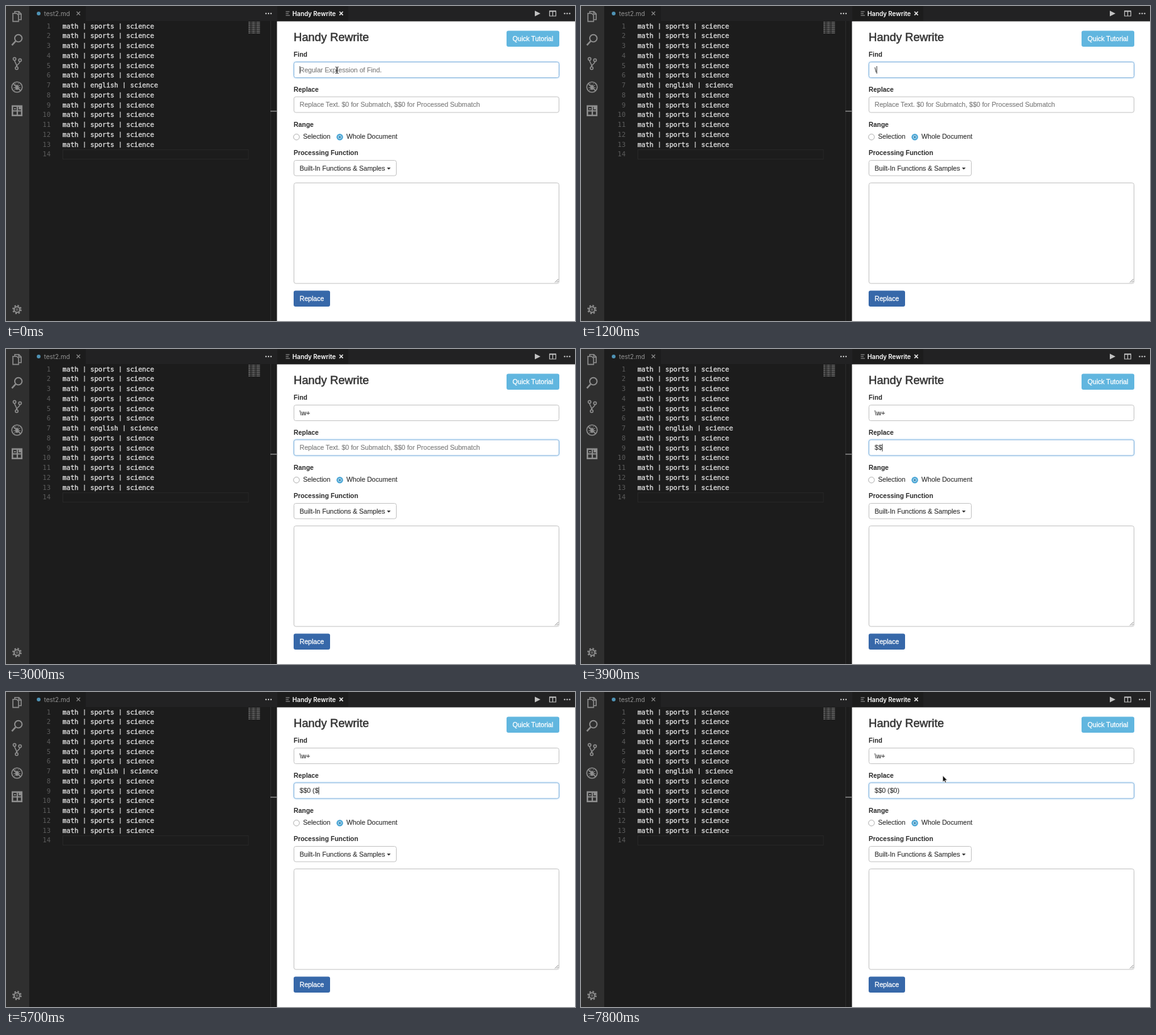
Write an HTML page that moves like this. It is 906 px wide and 503 px high and loops after 8000 ms.

```html
<!DOCTYPE html>
<html lang="en">
<head>
<meta charset="utf-8">
<title>Find and replace form</title>
<style>
  html, body { margin: 0; width: 100%; height: 100%; overflow: hidden; background: #1c1c1c; }
  svg { display: block; width: 100%; height: 100%; }
  text { white-space: pre; font: 10.6px "Liberation Sans", Arial, sans-serif; fill: #333; stroke: #333; stroke-width: .15px; }
  .light { fill: #fff; stroke: #fff; stroke-width: .3px; }
  .title { font-size: 18.3px; stroke-width: .5px; }
  .label { font-weight: bold; font-size: 10.4px; fill: #2a2a2a; stroke: none; }
  .tab { font: 10px Inter, Roboto, sans-serif; stroke: none; }
  .code text { font: 10.52px "DejaVu Sans Mono", monospace; fill: #dadada; stroke: #dadada; stroke-width: .4px; }
  .code .num { fill: #5c5c5c; stroke: none; text-anchor: end; }
  .bar { font-size: 8px; }
  .hint { fill: #7c7c7c; stroke: #7c7c7c; }
  .box { fill: #fff; stroke: #c2c2c2; }
  .box.focus { stroke: #82b2dc; filter: drop-shadow(0 0 1.5px rgba(102, 175, 233, .55)); }
  .icon { fill: none; stroke: #8e8e8e; stroke-width: 1.6; }
</style>
</head>
<body>
<svg viewBox="0 0 906 503" preserveAspectRatio="none">
  <rect width="906" height="503" fill="#1c1c1c"/>
  <rect width="37" height="503" fill="#2f2f2f"/>
  <rect x="37" width="869" height="24" fill="#222223"/>
  <rect x="37" width="90" height="24" fill="#1c1c1c"/>
  <rect x="432" width="113" height="24" fill="#1c1c1c"/>
  <rect x="431.5" y="24.5" width="474.5" height="478.5" fill="#fff"/>

  <!-- activity bar -->
  <g class="icon">
    <path d="M14 11V8.8h6.5l3.7 3.7v9.3h-4M20.3 9v4h4"/>
    <path d="M11 11.8h6l3 3v9.8h-9z"/>
    <circle cx="19.7" cy="51.6" r="5.8" stroke-width="1.9"/>
    <path d="M15.4 56l-6 6.6" stroke-width="2.6"/>
    <circle cx="13.6" cy="84.6" r="2.2"/>
    <circle cx="22.3" cy="86.6" r="2.2"/>
    <circle cx="17" cy="99.3" r="2.2"/>
    <path d="M13.8 87c0 4 3.2 4 3.2 10M22 89c0 4-5 3.5-5 8"/>
    <circle cx="17.5" cy="129.5" r="8.3"/>
    <ellipse cx="17.5" cy="130" rx="2.8" ry="4" fill="#8e8e8e" stroke="none"/>
    <path d="M12.5 126.500l3 1.5M12 130.5h11M13 134.500l2.5-2M22.5 126.500l-3 1.5M22 134.500l-2.5-2M16 125l-1-1.5M19 125l1-1.5" stroke-width="1"/>
    <path d="M11.7 123.700l11.6 11.6"/>
    <path d="M10.2 159.700h14.800v15h-14.800z" stroke-width="2.400"/>
    <path d="M10 167.500h8v7M18 160v7.500h7" stroke-width="2.200"/>
    <path d="M20.200 160h4.800v5h-4.800zM13 163h2.500v2h-2.500z" fill="#8e8e8e" stroke="none"/>
    <circle cx="17.5" cy="484.7" r="4.5" stroke-width="2"/>
    <circle cx="17.5" cy="484.7" r="1.4" stroke-width="1"/>
    <circle cx="17.5" cy="484.7" r="6.4" stroke-width="2" stroke-dasharray="2.500 2.526"/>
  </g>

  <!-- tab strip -->
  <circle cx="52" cy="12" r="3" fill="#4f93b5"/>
  <text class="tab" x="60.5" y="15.600" style="fill:#929292">test2.md</text>
  <path d="M112.5 9l5.5 5.6M118 9l-5.5 5.6" stroke="#8c8c8c" stroke-width="1.3"/>
  <path d="M445.5 9h6M445.5 12h4.5M445.5 15h6.5" stroke="#a0a0a0" stroke-width="1.2"/>
  <text class="tab" x="456" y="15.600" style="fill:#fff;font-weight:600;font-size:9.800px">Handy Rewrite</text>
  <path d="M531 9l5.5 5.6M536.5 9l-5.5 5.6" stroke="#e8e8e8" stroke-width="1.6"/>
  <path d="M842 7.500v9l9-4.5z" fill="#c2c2c2"/>
  <path d="M865.5 8.500h10v7.5h-10zM870.5 8v8" fill="none" stroke="#c2c2c2" stroke-width="1.2"/>
  <path d="M865 8.300h11" stroke="#c2c2c2" stroke-width="2"/>
  <g id="dots" fill="#c2c2c2"></g>

  <!-- editor -->
  <g class="code" id="code"></g>
  <rect x="90.5" y="229.5" width="295.5" height="15" fill="none" stroke="#272727"/>
  <g id="map" stroke="#747474" stroke-width=".8" stroke-dasharray="3.2 .8 .8 .8 4.8 .8 .8 .8 5.6 9"></g>
  <path d="M421.5 24v479" stroke="#2c2c2c"/>
  <path d="M421 168h10" stroke="#8a8a8a" stroke-width="1.5"/>

  <!-- form -->
  <text class="title" x="458" y="56">Handy Rewrite</text>
  <rect x="797" y="39.5" width="84" height="25.5" rx="3" fill="#61b6df"/>
  <text class="light" x="806.5" y="55.800">Quick Tutorial</text>
  <text class="label" x="458" y="81.300">Find</text>
  <text class="label" x="458" y="137">Replace</text>
  <text class="label" x="458" y="192.600">Range</text>
  <text class="label" x="458" y="238.400">Processing Function</text>
  <g id="fields"></g>

  <circle cx="462.5" cy="209.2" r="4.7" fill="#fff" stroke="#adadad"/>
  <text x="473" y="212.300">Selection</text>
  <circle cx="531.5" cy="209.2" r="5.2" fill="#4ba6d6"/>
  <circle cx="531.5" cy="209.2" r="3" fill="#a4d4ec"/>
  <circle cx="531.5" cy="209.2" r="1.5" fill="#2f7ca8"/>
  <text x="542" y="212.300">Whole Document</text>

  <rect class="box" x="458.5" y="246.5" width="163" height="24.5" rx="3"/>
  <text x="467.5" y="262.500">Built-In Functions &amp; Samples</text>
  <path d="M606.5 258h6l-3 3.200z" fill="#333"/>
  <rect class="box" x="458.5" y="282.5" width="422" height="160.5" rx="3"/>
  <path d="M874 441.500l5.5-5.5M877 441.500l2.5-2.5" stroke="#777" stroke-width=".9"/>
  <rect x="458" y="454.5" width="58" height="25.5" rx="3" fill="#3768a9"/>
  <text class="light" x="467.5" y="471">Replace</text>

  <path id="caret" stroke="#333" stroke-width="1"/>
  <path id="beam" d="M524.5 97.300q2.5 0 2.5 1.500v7.400q0 1.500-2.500 1.500M529.5 97.300q-2.500 0-2.500 1.500v7.400q0 1.500 2.500 1.500M525.5 103.500h3" fill="none" stroke="#222"/>
  <path id="arrow" d="M576 133.500v10.200l2.400-2.200 1.600 3.600 1.700-.8-1.600-3.400h3.200z" fill="#111" stroke="#fff" stroke-width=".7"/>
</svg>
<script>
const NS = 'http://www.w3.org/2000/svg';
const byId = id => document.getElementById(id);
const LOOP = 8000, STEP = 300;

function add(parent, tag, attrs, text) {
  const el = document.createElementNS(NS, tag);
  for (const key in attrs) el.setAttribute(key, attrs[key]);
  if (text !== undefined) el.textContent = text;
  return parent.appendChild(el);
}

// Words sit on the character grid; the smaller bar is centred in its cell.
function addRow(y, words) {
  const line = add(byId('code'), 'text', { x: 90, y });
  words.forEach((word, i) => {
    if (i) {
      add(line, 'tspan', {}, ' ');
      add(line, 'tspan', { class: 'bar', dx: .76, dy: -.9 }, '|');
      add(line, 'tspan', { dx: .76, dy: .9 }, ' ');
    }
    add(line, 'tspan', {}, word);
  });
}

for (const x of [414, 889.5])
  for (let i = 0; i < 3; i++) add(byId('dots'), 'circle', { cx: x + i * 4, cy: 12, r: 1.2 });

for (let i = 1; i <= 14; i++) {
  const y = 35.6 + (i - 1) * 15.75;
  add(byId('code'), 'text', { x: 71, y, class: 'num' }, i);
  if (i === 14) break;
  addRow(y, ['math', i === 7 ? 'english' : 'sports', 'science']);
  add(byId('map'), 'path', { d: `M386 ${24 + i * 1.5}h18.4` });
}

function makeField(y, hint) {
  const group = byId('fields');
  return {
    y, hint,
    box: add(group, 'rect', { x: 458.5, y, width: 422, height: 25, rx: 3 }),
    text: add(group, 'text', { x: 467.5, y: y + 16 })
  };
}
const fields = [
  makeField(89.5, 'Regular Expression of Find.'),
  makeField(145, 'Replace Text. $0 for Submatch, $$0 for Processed Submatch')
];

// Each entry: time, focused field, its typed value.
const keys = [
  [0, 0, ''], [1200, 0, '\\'], [1500, 0, '\\w'], [1800, 0, '\\w+'],
  [2400, 1, ''], [3300, 1, '$'], [3600, 1, '$$'], [4200, 1, '$$0'],
  [4500, 1, '$$0 '], [4800, 1, '$$0 ('], [5700, 1, '$$0 ($'],
  [6300, 1, '$$0 ($0'], [7200, 1, '$$0 ($0)']
];

const show = (id, on) => byId(id).setAttribute('visibility', on ? 'visible' : 'hidden');

function draw(time) {
  const t = Math.floor(time / STEP) * STEP;
  const values = ['', ''];
  let focus = 0, last = 0;
  for (const [at, field, value] of keys) {
    if (at > t) break;
    values[field] = value;
    focus = field;
    last = at;
  }
  fields.forEach((f, i) => {
    f.box.setAttribute('class', i === focus ? 'box focus' : 'box');
    f.text.setAttribute('class', values[i] ? '' : 'hint');
    f.text.textContent = values[i] || f.hint;
  });
  const { y, text } = fields[focus];
  const x = 468 + (values[focus] ? text.getComputedTextLength() : 0);
  byId('caret').setAttribute('d', `M${x} ${y + 6.5}v12`);
  show('caret', (t - last) % 1000 < 500);
  show('beam', t < 1200);
  show('arrow', t >= 7800);
}

const start = performance.now();
function tick() {
  draw((performance.now() - start) % LOOP);
  requestAnimationFrame(tick);
}
tick();
</script>
</body>
</html>
```
